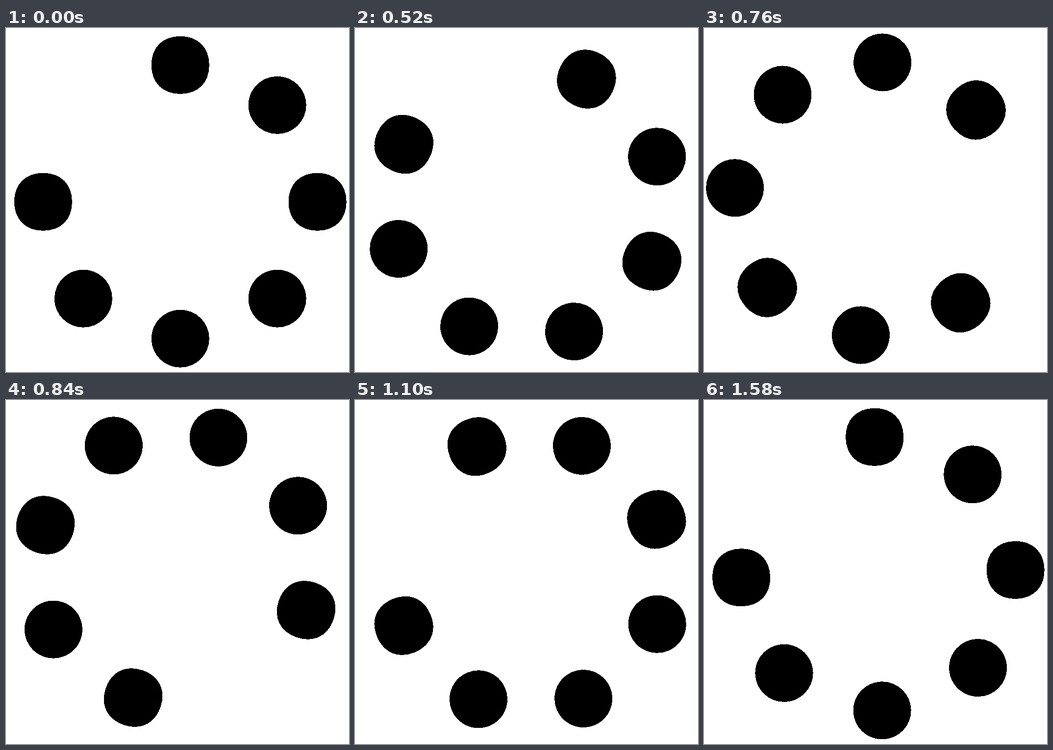
Write an HTML page that moves like this. It is 700 by 704 pixels and loops after 1600 ms.

```html
<!DOCTYPE html>
<html lang="en">
<head>
<meta charset="utf-8">
<title>Spinner</title>
<style>
  html, body { margin: 0; width: 100%; height: 100%; overflow: hidden; background: #fff; }
  svg { display: block; }
</style>
</head>
<body>
<svg width="700" height="704" viewBox="0 0 700 704" shape-rendering="crispEdges">
  <g id="ring"></g>
</svg>
<script>
const LOOP = 1600, STEP = 20, TURN = 1560;
const PIVOT = 350.1, CENTER = 355.75, RADIUS = 279.9, DOT = 59.1;
const ring = document.getElementById('ring');

// time (ms), angle (deg), speed (deg/ms): wind up, sweep round, overshoot, settle
const KEYS = [
  [0, 0, -0.081],
  [340, -5.2, 0.078],
  [660, 79.25, 0.503],
  [840, 198.1, 0.767],
  [960, 280.85, 0.556],
  [1280, 364.81, 0.072],
  [TURN, 360, -0.088]
];

// Closed four-arc outline; a larger k gives a squarer dot
function dotPath(x, y, r, k) {
  const c = r * k;
  return `M${x + r} ${y}` +
    `C${x + r} ${y + c} ${x + c} ${y + r} ${x} ${y + r}` +
    `S${x - r} ${y + c} ${x - r} ${y}` +
    `S${x - c} ${y - r} ${x} ${y - r}` +
    `S${x + r} ${y - c} ${x + r} ${y}Z`;
}

// Seven of eight places; the upper left one stays empty
for (let i = 0; i < 7; i++) {
  const a = i * Math.PI / 4;
  const square = i === 0 || i === 2 || i === 6;
  const dot = document.createElementNS('http://www.w3.org/2000/svg', 'path');
  dot.setAttribute('d', dotPath(
    CENTER + RADIUS * Math.sin(a),
    CENTER - RADIUS * Math.cos(a),
    DOT, square ? 0.61 : 0.5523));
  ring.appendChild(dot);
}

function angleAt(t) {
  const time = t % TURN;
  const i = KEYS.findIndex(k => k[0] > time);
  const [t0, a0, v0] = KEYS[i - 1], [t1, a1, v1] = KEYS[i];
  const d = t1 - t0, u = (time - t0) / d, w = 1 - u;
  return a0 * w * w * (1 + 2 * u) + a1 * u * u * (3 - 2 * u) +
    d * u * w * (v0 * w - v1 * u);
}

function draw(now) {
  const t = Math.floor((now % LOOP) / STEP + 1e-6) * STEP % LOOP;
  ring.setAttribute('transform', `rotate(${angleAt(t).toFixed(3)} ${PIVOT} ${PIVOT})`);
}

function tick(now) {
  draw(now);
  requestAnimationFrame(tick);
}

draw(0);
requestAnimationFrame(tick);
</script>
</body>
</html>
```
